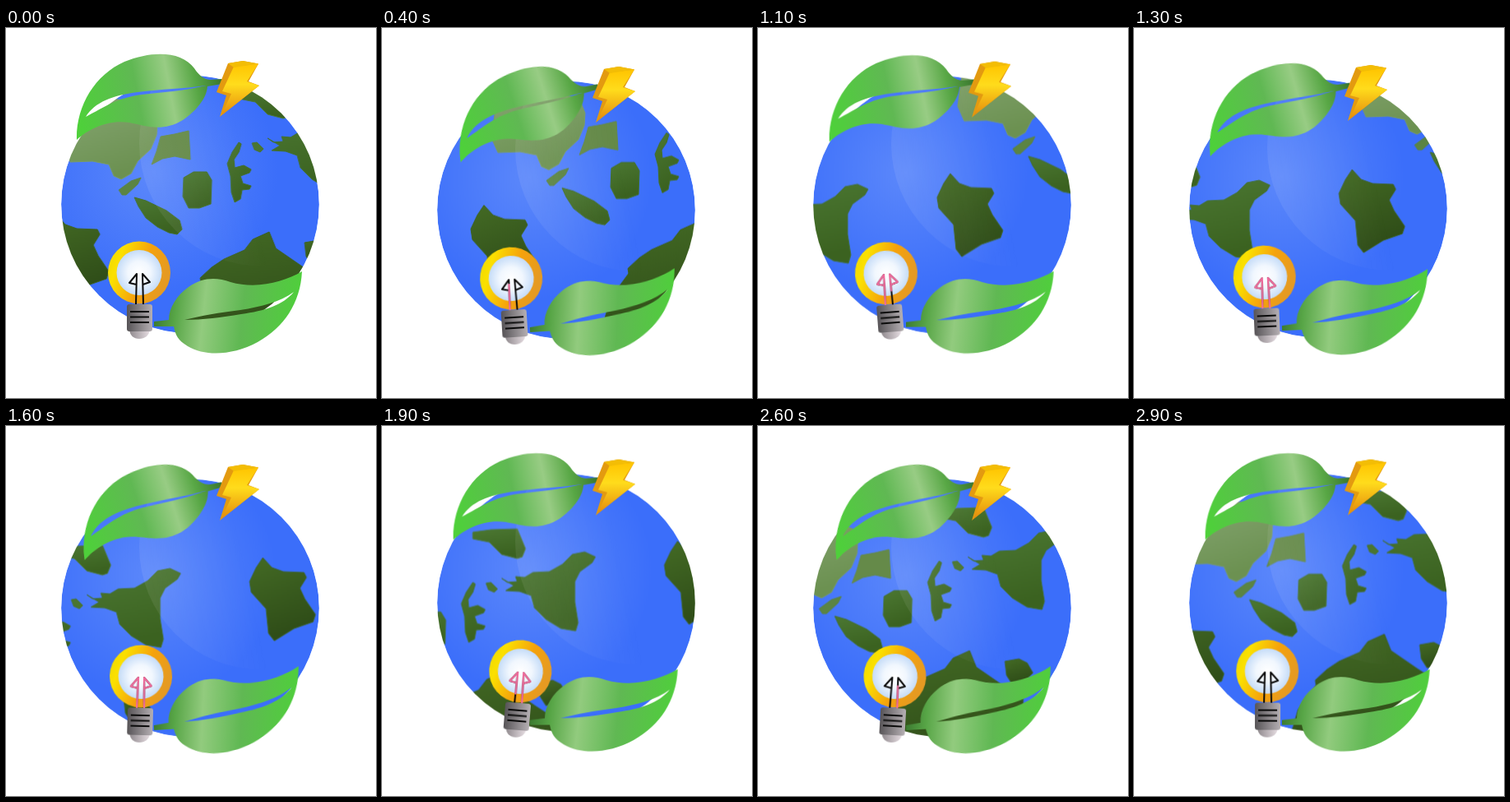
An HTML page that plays this animation: 450 by 450 pixels, repeating every 3 s.

```html
<!DOCTYPE html>
<html lang="en">
<head>
<meta charset="utf-8">
<title>Green energy globe</title>
<style>
html, body { margin: 0; width: 100%; height: 100%; overflow: hidden; background: #fff; }
svg { display: block; width: 450px; height: 450px; }

.bob { animation: bob .5s ease-in-out infinite alternate; }
.drift { animation: drift 3s linear infinite; }
.leaf { animation: sway .5s ease-in-out infinite alternate; }
.top { --turn: -7.6deg; transform-origin: 258px 67px; }
.low { --turn: -3.8deg; transform-origin: 182px 360px; }
.bulb { animation: rock 3s ease-in-out infinite; transform-origin: 162px 375px; }
.land polygon { stroke-width: 2; stroke-linejoin: round; }
.wire { fill: none; stroke: #0a0a0a; stroke-width: 2; stroke-linejoin: round; }
.glow { stroke: #ef6a9b; stroke-width: 2.2; stroke-dasharray: 1 1; stroke-dashoffset: 1; }
.left { animation: left 3s linear infinite; }
.right { animation: right 3s linear infinite; }

@keyframes bob { to { transform: translateY(7.5px); } }
@keyframes drift { to { transform: translate(471px, -138px); } }
@keyframes sway { to { transform: rotate(var(--turn)); } }
@keyframes rock {
  24% { transform: rotate(-6deg); }
  75% { transform: rotate(6deg); }
}
@keyframes left {
  0% { stroke-dashoffset: 1; }
  25%, 60% { stroke-dashoffset: 0; }
  80%, 100% { stroke-dashoffset: -1; }
}
@keyframes right {
  0%, 20% { stroke-dashoffset: 1; }
  43%, 77% { stroke-dashoffset: 0; }
  95%, 100% { stroke-dashoffset: -1; }
}
</style>
</head>
<body>
<svg viewBox="0 0 450 450">
  <defs>
    <clipPath id="ball"><circle cx="224" cy="214.5" r="156.8"/></clipPath>
    <radialGradient id="sea" gradientUnits="userSpaceOnUse" cx="180" cy="175" r="150">
      <stop offset="0" stop-color="#5c88fb"/>
      <stop offset="1" stop-color="#3b6efa"/>
    </radialGradient>
    <linearGradient id="sheen" gradientUnits="userSpaceOnUse" x1="150" y1="180" x2="290" y2="150">
      <stop offset="0" stop-color="#fff" stop-opacity=".09"/>
      <stop offset="1" stop-color="#fff" stop-opacity="0"/>
    </linearGradient>
    <linearGradient id="plain" x2=".3" y2="1">
      <stop offset="0" stop-color="#4c7833"/>
      <stop offset="1" stop-color="#3b6220"/>
    </linearGradient>
    <linearGradient id="dark" x2=".3" y2="1">
      <stop offset="0" stop-color="#446b25"/>
      <stop offset="1" stop-color="#2f4d18"/>
    </linearGradient>
    <linearGradient id="pale" x2=".4" y2="1">
      <stop offset="0" stop-color="#86a673"/>
      <stop offset="1" stop-color="#6c9151"/>
    </linearGradient>
    <linearGradient id="topFill" gradientUnits="userSpaceOnUse" x1="86" y1="100" x2="264" y2="66">
      <stop offset="0" stop-color="#4ed03a"/>
      <stop offset=".42" stop-color="#60b853"/>
      <stop offset=".64" stop-color="#98cc84"/>
      <stop offset=".82" stop-color="#58a745"/>
      <stop offset="1" stop-color="#39752e"/>
    </linearGradient>
    <linearGradient id="lowFill" gradientUnits="userSpaceOnUse" x1="180" y1="330" x2="360" y2="350">
      <stop offset="0" stop-color="#39752e"/>
      <stop offset=".15" stop-color="#57a546"/>
      <stop offset=".34" stop-color="#92cb7e"/>
      <stop offset=".6" stop-color="#60b853"/>
      <stop offset="1" stop-color="#4ed03a"/>
    </linearGradient>
    <linearGradient id="gold" x2="0" y2="1">
      <stop offset="0" stop-color="#ffc400"/>
      <stop offset=".4" stop-color="#ffdc1c"/>
      <stop offset="1" stop-color="#e58a0c"/>
    </linearGradient>
    <linearGradient id="ring" x2="1" y2=".35">
      <stop offset="0" stop-color="#e9d800"/>
      <stop offset=".25" stop-color="#fbe000"/>
      <stop offset=".65" stop-color="#f5a20c"/>
      <stop offset="1" stop-color="#e59a22"/>
    </linearGradient>
    <radialGradient id="glass">
      <stop offset="0" stop-color="#fff"/>
      <stop offset=".5" stop-color="#f1f7fe"/>
      <stop offset="1" stop-color="#c5dcf8"/>
    </radialGradient>
    <linearGradient id="metal">
      <stop offset="0" stop-color="#575457"/>
      <stop offset="1" stop-color="#b5afb3"/>
    </linearGradient>
    <linearGradient id="cap">
      <stop offset="0" stop-color="#8f898d"/>
      <stop offset="1" stop-color="#e6dde2"/>
    </linearGradient>

    <g id="map">
      <polygon fill="url(#pale)" stroke="#7a9c63" points="70,145 78,163 105,162 125,166 131,180 140,184 152,177 160,162 176,147 183,130 184,115 178,100 150,88 110,85 75,110"/>
      <polygon fill="#658a49" stroke="#658a49" points="188,132 205,129 222,125 224,160 205,156 190,159 177,166 183,150"/>
      <polygon fill="#5b8443" stroke="#5b8443" points="137,197 152,186 164,182 160,190 146,203 141,203"/>
      <polygon fill="url(#plain)" stroke="#43702a" points="156,206 170,210 195,222 211,234 214,245 208,251 198,249 184,242 170,231 161,217"/>
      <polygon fill="url(#plain)" stroke="#43702a" points="216,182 228,175 244,175 250,185 249,214 235,219 222,219 215,205"/>
      <polygon fill="url(#plain)" stroke="#43702a" points="275,151 283,139 286,141 283,151 277,160 278,170 289,167 298,172 296,176 285,180 288,189 298,192 296,196 287,197 285,208 278,212 274,200 273,180 269,165"/>
      <polygon fill="#4a7531" stroke="#4a7531" points="299,140 305,139 313,147 309,151 302,148"/>
      <polygon fill="url(#plain)" stroke="#43702a" points="318,134 325,139 337,138 335,132 346,133 356,127 376,126 392,117 404,105 419,102 432,108 428,115 413,126 407,138 407,163 411,188 408,198 390,195 372,184 358,170 354,155 340,150 323,149 333,143"/>
      <polygon fill="url(#dark)" stroke="#3d6321" points="61,227 72,239 86,244 111,245 114,251 106,264 112,277 125,296 122,305 99,313 75,328 68,319 65,289 47,269 45,256 53,239"/>
      <polygon fill="url(#dark)" stroke="#3b6020" points="236,304 250,291 265,281 290,270 300,257 320,248 328,268 360,290 385,306 385,340 300,385 205,375 215,340 237,310"/>
      <polygon fill="url(#dark)" stroke="#3d6321" points="363,261 380,258 390,263 397,275 388,284 372,289 365,278"/>
      <polygon fill="url(#plain)" stroke="#4c7833" points="283,78 305,75 337,74 347,98 343,108 337,110 318,105 303,90 283,86"/>
    </g>
  </defs>

  <g class="bob">
    <g clip-path="url(#ball)">
      <circle cx="224" cy="214.5" r="157" fill="url(#sea)"/>
      <g class="land drift">
        <use href="#map"/>
        <use href="#map" x="-471" y="138"/>
      </g>
      <circle cx="312" cy="140" r="150" fill="url(#sheen)"/>
    </g>

    <path class="leaf low" fill="url(#lowFill)" fill-rule="evenodd" d="M360 296C358 335 338 364 306 382C276 398 243 400 221 387C209 380 206 373 204 363L180 363L180 357L198 355C198 340 208 325 222 315C239 303 256 303 273 309C305 318 338 309 360 296Z
      M350 321C334 333 310 339 285 343C260 346 237 350 217 355C240 355 262 352 286 348C315 344 337 337 350 321Z"/>
    <path class="leaf top" fill="url(#topFill)" fill-rule="evenodd" d="M86 136C85 95 108 57 144 41C178 27 214 28 229 49C235 58 240 62 248 63L263 62L263 68L245 71C244 86 231 101 215 112C190 127 170 119 150 115C125 111 101 122 86 136Z
      M97 108C108 90 130 82 160 78C190 74 215 74 243 70C215 77 190 78 165 81C135 85 120 96 97 108Z"/>

    <g>
      <path fill="#e39a10" d="M270 43L288 40L307 43.5L295 65L308 70L260 108L268 82L256 78Z"/>
      <path fill="url(#gold)" d="M277 47L307 43.5L293 65L308 70L262 106L274 80L263 77Z"/>
      <path fill="#f3bd05" d="M270 43L288 40L307 43.5L277 48Z"/>
    </g>

    <g class="bulb">
      <path fill="url(#cap)" d="M150 367H175C174 374 169 378 162 378C155 378 151 374 150 367Z"/>
      <rect x="147" y="336" width="31" height="33" rx="3" fill="url(#metal)"/>
      <path stroke="#0a0a0a" stroke-width="2.2" d="M151 345H174M151 351.5H174M151 358H174"/>
      <circle cx="162" cy="297.5" r="38" fill="url(#ring)"/>
      <circle cx="162" cy="297.5" r="27.5" fill="url(#glass)"/>
      <g class="wire">
        <path d="M158 336L159 299L150 310L158.500 312"/>
        <path d="M166.500 312L175 309L166 299L167 336"/>
        <path class="glow left" pathLength="1" d="M158 336L159 299L150 310L158.500 312"/>
        <path class="glow right" pathLength="1" d="M166.500 312L175 309L166 299L167 336"/>
      </g>
    </g>
  </g>
</svg>
</body>
</html>
```
